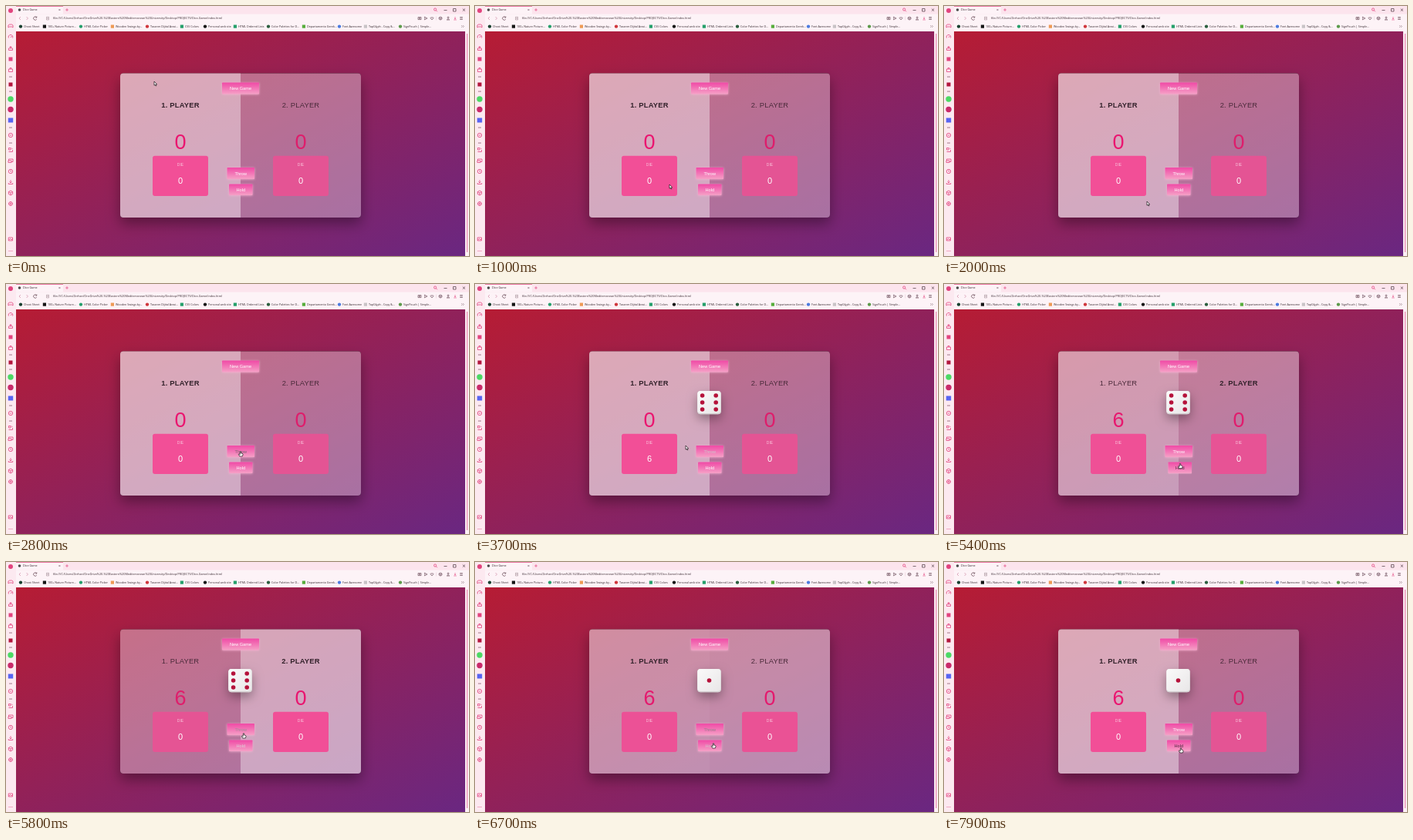
Write an HTML page with a canvas that moves like this. It is 600 px wide and 325 px high and loops after 8 s.

```html
<!DOCTYPE html>
<html lang="en">
<head>
<meta charset="utf-8">
<title>Dice Game</title>
<style>
html, body { margin: 0; width: 100%; height: 100%; overflow: hidden; }
canvas { display: block; width: 600px; height: 325px; }
</style>
</head>
<body>
<canvas id="stage"></canvas>
<script>
const W = 600, H = 325, LOOP = 8000;
const THROW_1 = 3000, HOLD_1 = 5270, THROW_2 = 6465;
const SANS = '"Liberation Sans", Arial, sans-serif';
const UI = '"Open Sans", "Noto Sans", sans-serif';
const PINK = '#e2447e';

const canvas = document.getElementById('stage');
const ctx = canvas.getContext('2d');
const dpr = window.devicePixelRatio || 1;
canvas.width = W * dpr;
canvas.height = H * dpr;

// Pointer stops: time, x, y
const path = [
  [0, 192, 98], [1000, 252, 232], [1100, 252, 232], [1300, 257, 246], [1400, 257, 246],
  [2000, 263, 254], [2400, 288, 234], [2750, 304, 219], [3250, 304, 218], [3700, 273, 210],
  [4100, 283, 222], [4600, 305, 236], [5350, 306, 235], [5500, 306, 234], [5700, 308, 224],
  [6550, 308, 223], [6700, 309, 237], [7200, 307, 243], [8000, 307, 243]
];

const buttons = {
  fresh: { label: 'New Game', x: 280, y: 99.5, w: 48, h: 15, press: [] },
  toss: { label: 'Throw', x: 286.5, y: 210, w: 35.5, h: 15, press: [THROW_1, THROW_2] },
  hold: { label: 'Hold', x: 289, y: 231.5, w: 30.5, h: 14.5, press: [HOLD_1 + 60] }
};

const bookmarks = [
  ['Cheat Sheet', 23, '#17402f'], ['100+ Nature Picture...', 54, '#151515'],
  ['HTML Color Picker', 101, '#25a06b'], ['Wooden Swings by...', 142, '#ee9a55'],
  ['Tasarım Dijital Arasi...', 187, '#d0363c'], ['CSS Colors', 232, '#25a06b'],
  ['Personal web site', 262, '#151515'], ['HTML Ordered Lists', 301, '#25a06b'],
  ['Color Palettes for D...', 344, '#2c5f3f'], ['Departamento Gerek...', 390, '#57ad3c'],
  ['Font Awesome', 436, '#4c7be0'], ['TapGlyph - Copy &...', 470, '#c8c3c6'],
  ['SignPouch | Simple...', 515, '#5c9a4a']
];

const mix = (a, b, k) => a + (b - a) * k;
const blend = (a, b, k) => `rgb(${a.map((v, i) => Math.round(mix(v, b[i], k))).join(',')})`;
const clamp = v => Math.min(1, Math.max(0, v));

// CSS "ease" curve
function ease(x) {
  if (x <= 0 || x >= 1) return clamp(x);
  let lo = 0, hi = 1;
  for (let i = 0; i < 16; i++) {
    const u = (lo + hi) / 2, v = 1 - u;
    if (0.75 * v * v * u + 0.75 * v * u * u + u ** 3 < x) lo = u; else hi = u;
  }
  const u = lo, v = 1 - u;
  return 0.3 * v * v * u + 3 * v * u * u + u ** 3;
}

function pointer(t) {
  t = clamp(t / LOOP) * LOOP;
  let i = 0;
  while (i < path.length - 2 && path[i + 1][0] <= t) i++;
  const [t0, x0, y0] = path[i], [t1, x1, y1] = path[i + 1];
  const k = (t - t0) / (t1 - t0), s = k * k * (3 - 2 * k);
  return { x: mix(x0, x1, s), y: mix(y0, y1, s) };
}

const inside = (b, p) => p.x >= b.x && p.x <= b.x + b.w && p.y >= b.y && p.y <= b.y + b.h;

// Share of the last 300 ms the pointer spent on a button
function hover(b, t) {
  let n = 0;
  for (let i = 0; i < 15; i++) n += inside(b, pointer(t - i * 20));
  return n / 15;
}

function rect(x, y, w, h, fill) {
  ctx.fillStyle = fill;
  ctx.fillRect(x, y, w, h);
}

function round(x, y, w, h, r, fill) {
  ctx.beginPath();
  ctx.roundRect(x, y, w, h, r);
  ctx.fillStyle = fill;
  ctx.fill();
}

function dot(x, y, r, fill) {
  ctx.beginPath();
  ctx.arc(x, y, r, 0, Math.PI * 2);
  ctx.fillStyle = fill;
  ctx.fill();
}

function text(str, x, y, font, fill, align = 'center', spacing = 0) {
  ctx.font = font;
  ctx.fillStyle = fill;
  ctx.textAlign = align;
  ctx.letterSpacing = spacing + 'px';
  ctx.fillText(str, x, y);
}

function stroke(d, color = PINK, width = 0.8, x = 0, y = 0) {
  ctx.save();
  ctx.translate(x, y);
  ctx.strokeStyle = color;
  ctx.lineWidth = width;
  ctx.stroke(new Path2D(d));
  ctx.restore();
}

function shadow(color, blur, dy) {
  ctx.shadowColor = color;
  ctx.shadowBlur = blur * dpr;
  ctx.shadowOffsetY = dy * dpr;
}

function gradient(x0, y0, x1, y1, a, b) {
  const g = ctx.createLinearGradient(x0, y0, x1, y1);
  g.addColorStop(0, a);
  g.addColorStop(1, b);
  return g;
}

function drawSidebar() {
  rect(0, 0, 13, H, '#fce9f0');
  dot(6, 6, 3, PINK);
  const icons = [
    [26, 'M-3 2V-1L-1.5-2H1.5L3-1V2L1.5 1H-1.5Z'],
    [40, 'M-2.5 1.5A2.8 2.8 0 1 1 2.5 1.5M0 1L1.5-1'],
    [55, 'M-2.5 2.5H2.5V0H-2.5ZM0 0V-3M-1.5-1.5H1.5'],
    [83, 'M-2.5-1H2.5V2.5H-2.5ZM-1-1V-2.5H1V-1'],
    [168, 'M-2.7 0A2.7 2.7 0 1 0 2.7 0A2.7 2.7 0 1 0-2.7 0M-1.3 0H1.3'],
    [187, 'M-2.5-2.5H0V0H-2.5ZM-2.5 2.5H2.5V0M1-2.5L2.5-1'],
    [201, 'M-2.5 0V-2H3V1.5H1M-3 0H1V2.5H-3Z'],
    [215, 'M-2.7 0A2.7 2.7 0 1 0 2.7 0A2.7 2.7 0 1 0-2.7 0M0-1.6V0L1.2 1'],
    [229, 'M0-2.7V1M-1.5-.5L0 1L1.5-.5M-2.7 1V2.5H2.7V1'],
    [243, 'M0-3L2.6-1.5V1.5L0 3L-2.6 1.5V-1.5ZM-2.6-1.5L0 0L2.6-1.5M0 0V3'],
    [257, 'M-2.4 0A2.4 2.4 0 1 0 2.4 0A2.4 2.4 0 1 0-2.4 0M-1 0A1 1 0 1 0 1 0A1 1 0 1 0-1 0M-3 0H-2M2 0H3M0-3V-2M0 2V3'],
    [303, 'M-2.7-2H2.5V2H-2.7ZM-2.5 1.5L-.5-.5L1 1L2.5 0']
  ];
  for (const [y, d] of icons) stroke(d, PINK, 0.8, 6, y);
  for (const y of [92, 111, 158, 178]) rect(4, y - 0.4, 4, 0.9, '#9a6f80');
  rect(3.5, 66.5, 5, 5, PINK);
  rect(3.5, 99.5, 5, 5, '#b3173d');
  dot(6, 121, 3.7, '#4cd964');
  dot(6, 134.5, 3.7, '#c92a6a');
  rect(2.8, 145.5, 6.4, 6, '#5865f2');
  for (const x of [4, 6, 8]) dot(x, 318.5, 0.5, PINK);
}

function drawBrowser() {
  rect(0, 0, W, 33, '#fdf3f7');
  rect(0, 0, W, 10.5, '#fce4ed');
  rect(13, 0, 61, 10.5, '#fdf3f7');
  rect(13, 0, 61, 0.7, PINK);
  drawSidebar();
  dot(17.5, 5, 1.8, '#4a4a4a');
  text('Dice Game', 22, 6.4, '3.7px ' + UI, '#33252c', 'left');
  stroke('M68.4 4L70.4 6M70.4 4L68.4 6', '#5b3a48', 0.5);
  stroke('M77.2 5H80.8M79 3.2V6.8', PINK, 0.7);
  stroke('M554.5 4.5A1.6 1.6 0 1 0 557.7 4.5A1.6 1.6 0 1 0 554.5 4.5M557.3 5.6L558.8 7.2', PINK, 0.8);
  stroke('M567.5 5.5H571.5M579.5 3.5H583V7H579.5ZM591.8 3.5L595 6.7M595 3.5L591.8 6.7', '#4d3540', 0.7);

  stroke('M19 14L17 16L19 18M26.5 14L28.5 16L26.5 18', '#d08ba6', 0.7);
  stroke('M39.6 14.7A2.2 2.2 0 1 0 39.8 17M39.8 13.5V15H38.2', '#5b3a48', 0.7);
  stroke('M52.5 14.2H55.5V18H52.5ZM53.3 15.5H54.8M53.3 16.6H54.8', '#7b606c', 0.4);
  text('file:///C:/Users/Zerhan/OneDrive%20-%20Eastern%20Mediterranean%20University/Desktop/PROJECTS/Dice-Game/index.html',
    61, 17.4, '3.75px ' + UI, '#3b2a32', 'left');
  const tools = [
    [536, 'M-2-1.4H2V1.6H-2ZM-.8 0A.8 .8 0 1 0 .8 0A.8 .8 0 1 0-.8 0'],
    [544, 'M-1.7-1.9L2 0L-1.7 1.9L-1 0Z'],
    [552, 'M0 2L-2-.2Q-1.6-2 0-.8Q1.6-2 2-.2Z'],
    [563, 'M0-2.1L1.9-1V1.1L0 2.1L-1.9 1.1V-1ZM-1.9-1L0 0L1.9-1M0 0V2'],
    [573, 'M-1-1A1 1 0 1 0 1-1A1 1 0 1 0-1-1M-1.8 2Q0-.7 1.8 2Z'],
    [582, 'M0-2V1M-1.1 0L0 1L1.1 0M-1.8 2H1.8'],
    [590, 'M-1.8-1.5H1.8M-1.8 0H1.8M-1.8 1.5H1.8']
  ];
  for (const [x, d] of tools) stroke(d, x === 582 ? PINK : '#5b3a48', 0.6, x, 16);
  rect(557.5, 13.5, 0.5, 5, '#e4c7d3');

  bookmarks.forEach(([label, x, color], i) => {
    if (i % 2) rect(x - 6.2, 24.5, 4.2, 4.2, color);
    else dot(x - 4, 26.6, 2.2, color);
    text(label, x, 28, '3.65px ' + UI, '#33252c', 'left');
  });
  stroke('M590 25L591.5 26.5L590 28M592 25L593.5 26.5L592 28', '#5b3a48', 0.4);
}

function drawPage() {
  // Half of the blend falls on the line between the other two corners.
  const w = 582, h = 292, cx = 13 + w / 2, cy = 33 + h / 2;
  const k = w * h / (w * w + h * h);
  const dx = h * k, dy = w * k;
  rect(13, 33, w, h, gradient(cx - dx, cy - dy, cx + dx, cy + dy, '#b61c34', '#6a2781'));
  rect(595, 33, 5, H - 33, '#fdf0f5');
  rect(597, 36, 1.2, 284, '#e886ae');
}

function drawPlayer(n, on, active, score, die) {
  const x = n === 1 ? 148 : 304, cx = x + 78;
  const corners = n === 1 ? [4, 0, 0, 4] : [0, 4, 4, 0];
  round(x, 87.5, 156, 187.5, corners, `rgba(255,255,255,${0.4 * on})`);
  text(n + '. PLAYER', cx, 131.8, (active ? 'bold ' : '') + '9.4px ' + SANS,
    active ? '#33222b' : '#4a2a3a', 'center', 0.22);
  text(score, cx, 185.8, '27px ' + SANS, blend([222, 30, 108], [234, 22, 112], on));
  round(cx - 36, 194.7, 72, 52.3, 3, blend([228, 84, 148], [242, 79, 151], on));
  text('DIE', cx, 207.8, '5px ' + SANS, '#f9c3da');
  text(die, cx, 230.6, '11px ' + SANS, '#fff');
}

function drawButton(b, t) {
  const pressed = b.press.some(p => t >= p - 70 && t < p + 110);
  const x = b.x + (pressed ? 1.5 : 0);
  ctx.save();
  shadow('rgba(246,176,210,0.9)', pressed ? 1 : 3, 0.6);
  round(x, b.y, b.w, b.h, 0.8, gradient(0, b.y, 0, b.y + b.h, '#f04aa6', '#f5a0c6'));
  ctx.restore();
  text(b.label, x + b.w / 2, b.y + b.h / 2 + 2, '5.6px ' + SANS,
    blend([255, 255, 255], [75, 40, 60], hover(b, t)));
}

function drawDie(value) {
  ctx.save();
  shadow('rgba(0,0,0,0.35)', 14, 6);
  round(288.3, 139, 30.5, 30.3, 4, '#e2dfe0');
  ctx.restore();
  round(288.3, 139, 30.5, 30.3, 4, '#d6d2d4');
  round(288.3, 139, 30, 29, 4, gradient(290, 140, 317, 168, '#faf9f9', '#e9e7e8'));
  const pips = value === 1 ? [[303.5, 154]]
    : [294.6, 312.2].flatMap(x => [145, 154, 163].map(y => [x, y]));
  for (const [x, y] of pips) dot(x, y, 2.8, '#b5123a');
}

function drawPointer(t) {
  const p = pointer(t);
  const hand = Object.values(buttons).some(b => inside(b, p));
  const shape = new Path2D(hand
    ? 'M-.7 0Q0-.9.7 0V2L2.6 2.6Q3.2 3 3 4L2.4 6H-1.2L-2.8 3.4Q-2.4 2.5-.7 3.6Z'
    : 'M0 0V5.2L1.2 4.2L2 6L2.9 5.6L2.1 3.9H3.7Z');
  ctx.save();
  ctx.translate(p.x, p.y - (hand ? 1 : 0));
  ctx.fillStyle = '#fff';
  ctx.strokeStyle = '#1c1418';
  ctx.lineWidth = 0.7;
  ctx.fill(shape);
  ctx.stroke(shape);
  ctx.restore();
}

function drawCard(t) {
  ctx.save();
  ctx.beginPath();
  ctx.rect(13, 33, 582, 292);
  ctx.roundRect(148, 87.5, 312, 187.5, 4);
  ctx.clip('evenodd');
  shadow('rgba(0,0,0,0.36)', 17, 8);
  round(148, 87.5, 312, 187.5, 4, '#000');
  ctx.restore();
  round(148, 87.5, 312, 187.5, 4, 'rgba(255,255,255,0.35)');

  const second = ease((t - HOLD_1) / 750) - ease((t - THROW_2) / 750);
  const secondTurn = t >= HOLD_1 && t < THROW_2;
  const rolled = t >= THROW_1 && t < HOLD_1;
  drawPlayer(1, 1 - second, !secondTurn, t >= HOLD_1 ? 6 : 0, rolled ? 6 : 0);
  drawPlayer(2, second, secondTurn, 0, 0);
  if (t >= THROW_1) drawDie(t < THROW_2 ? 6 : 1);
  for (const b of Object.values(buttons)) drawButton(b, t);
}

function frame() {
  const t = performance.now() % LOOP;
  ctx.setTransform(dpr, 0, 0, dpr, 0, 0);
  drawBrowser();
  drawPage();
  drawCard(t);
  drawPointer(t);
  requestAnimationFrame(frame);
}
frame();
</script>
</body>
</html>
```
